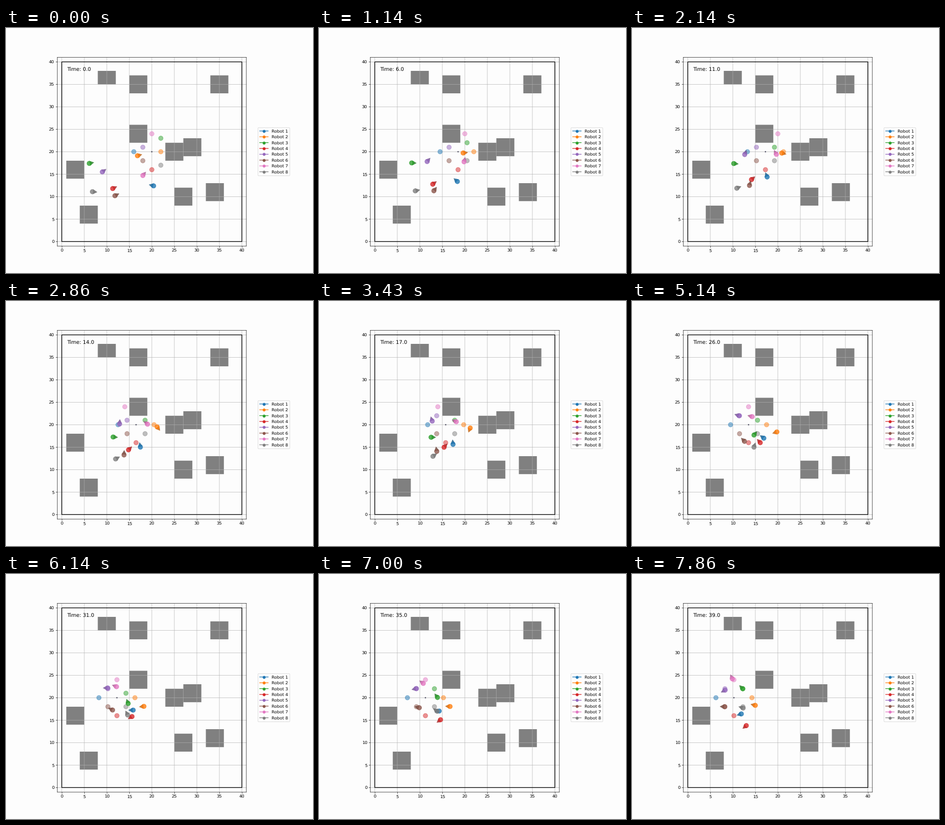
Write a matplotlib script that moves like this. It is 600 px wide and 480 px high and loops after 8 s.

```python
import numpy as np
import matplotlib.pyplot as plt
from matplotlib.animation import FuncAnimation
from matplotlib.colors import to_rgb
from matplotlib.patches import Circle, Polygon, Rectangle

plt.rcParams.update({"path.snap": False, "text.hinting": "none"})

STEPS, STEP_MS = 40, 200
TICK_MS, LEAD_MS = 40, 80
FRAMES = STEPS * STEP_MS // TICK_MS
PAPER = "#fdfdfd"
COLORS = [f"C{i}" for i in range(8)]

# Obstacles as x, y, height; all have the same width
WIDTH, MARGIN = 4, 1
BLOCKS = [(8, 35, 3), (15, 33, 4), (33, 33, 4), (15, 22, 4), (23, 18, 4),
          (27, 19, 4), (1, 14, 4), (4, 4, 4), (25, 8, 4), (32, 9, 4)]

# Formation: four goals on the axes, four on the diagonals
OFFSETS = [(-4, 0), (4, 0), (2, 2), (0, -4), (-2, 2), (-2, -2), (0, 4), (2, -2)]

# Each robot follows a cubic through four points, evenly spaced in time
ROUTES = [
    [(20.4, 12.4), (17.5, 14.8), (16.9, 17.0), (11.9, 16.4)],
    [(16.8, 19.1), (21.1, 19.6), (19.8, 18.4), (15.0, 18.3)],
    [(6.1, 17.4), (11.0, 17.3), (14.7, 17.7), (12.2, 22.0)],
    [(11.3, 11.8), (14.6, 14.2), (16.1, 16.0), (13.0, 13.8)],
    [(9.0, 15.5), (12.8, 19.9), (11.4, 22.0), (8.3, 21.7)],
    [(11.8, 10.2), (13.8, 13.0), (12.6, 16.3), (8.2, 18.0)],
    [(18.0, 14.7), (19.3, 19.9), (14.3, 21.8), (9.9, 24.2)],
    [(6.8, 11.1), (11.6, 12.2), (14.7, 15.0), (12.3, 17.7)],
]
KNOTS = np.linspace(0, STEPS - 1, 4)
CURVES = [[np.poly1d(np.polyfit(KNOTS, axis, 3)) for axis in zip(*route)]
          for route in ROUTES]


def pose(curve, n):
    """Position at step n, and the unit vector of travel."""
    p = np.array([f(n) for f in curve])
    v = np.array([f.deriv()(n) for f in curve])
    return p, v / np.hypot(*v)


def nose(p, d):
    """Triangle that points along d."""
    side = 0.5 * np.array([-d[1], d[0]])
    return [p + 1.05 * d, p + 0.15 * d + side, p + 0.15 * d - side]


def free_goal(x, y):
    """Push a goal out of any obstacle, past the nearest side."""
    for x0, y0, h in BLOCKS:
        x1, y1 = x0 + WIDTH, y0 + h
        if x0 - MARGIN <= x <= x1 + MARGIN and y0 - MARGIN <= y <= y1 + MARGIN:
            exits = [(abs(x - x0), (x0 - MARGIN, y)), (abs(x - x1), (x1 + MARGIN, y)),
                     (abs(y - y0), (x, y0 - MARGIN)), (abs(y - y1), (x, y1 + MARGIN))]
            return min(exits, key=lambda e: e[0])[1]
    return x, y


def shade(color, k):
    return tuple(k * c for c in to_rgb(color))


fig = plt.figure(figsize=(10, 8), dpi=60, facecolor=PAPER)
ax = fig.add_axes([0.167, 0.11, 0.616, 0.77], facecolor=PAPER)
ticks = range(0, 41, 5)
ax.set(xlim=(-1, 41), ylim=(-1, 41), xticks=ticks, yticks=ticks)
ax.grid(True)

for x, y, h in BLOCKS:
    ax.add_patch(Rectangle((x, y), WIDTH, h, fc="gray", lw=0))
ax.add_patch(Rectangle((0, 0), 40, 40, fill=False, ec="black", lw=1.6, zorder=2))

for i, c in enumerate(COLORS):
    ax.plot([], [], "o-", color=c, label=f"Robot {i + 1}")
ax.legend(loc="center left", bbox_to_anchor=(1.05, 0.5), labelspacing=0.44)

clock = ax.text(0.05, 0.95, "", transform=ax.transAxes, fontsize=12, va="top")
center = ax.add_patch(Circle((20, 20), 0.15, fc="#22223a", alpha=0.75, lw=0, zorder=3))
goals = [ax.add_patch(Circle((0, 0), 0.5, color=c, alpha=0.5, zorder=3))
         for c in COLORS]
noses, bodies = [], []
for c in COLORS:
    tip = Polygon(np.zeros((3, 2)), color=shade(c, 0.75), alpha=0.8, lw=0.5, zorder=4)
    body = Circle((0, 0), 0.5, color=c, alpha=0.8, zorder=4)
    noses.append(ax.add_patch(tip))
    bodies.append(ax.add_patch(body))


def update(frame):
    n = min((frame * TICK_MS + LEAD_MS) // STEP_MS, STEPS - 1)
    cx, cy = 20 - 0.25 * n, 20
    clock.set_text(f"Time: {n:.1f}")
    center.center = cx, cy
    for goal, (dx, dy) in zip(goals, OFFSETS):
        goal.center = free_goal(cx + dx, cy + dy)
    for tip, body, curve in zip(noses, bodies, CURVES):
        p, d = pose(curve, n)
        tip.set_xy(nose(p, d))
        body.center = p
    return [clock, center, *goals, *noses, *bodies]


anim = FuncAnimation(fig, update, frames=FRAMES, interval=TICK_MS, repeat=True)
plt.show()
```
